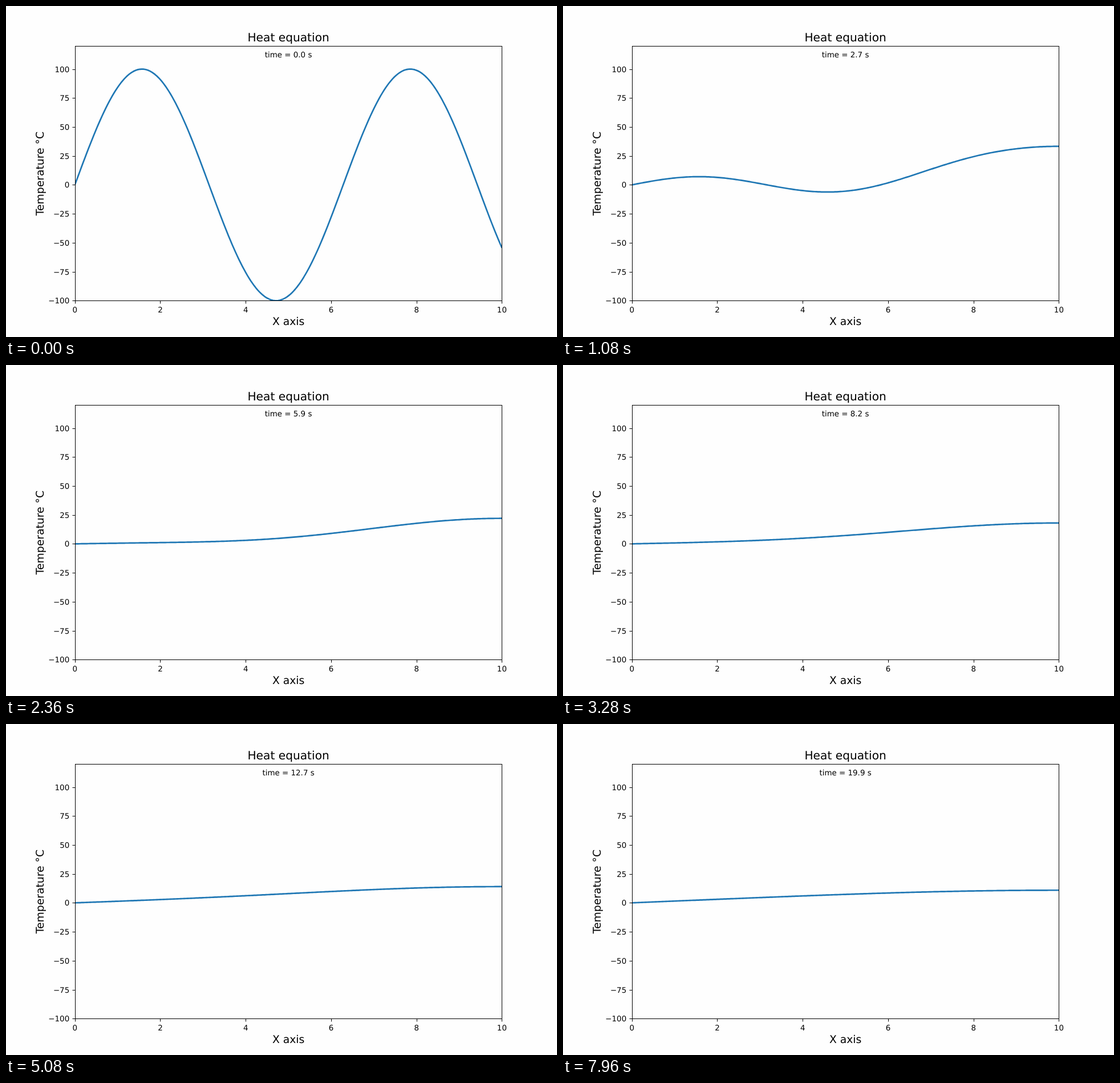
Animation, 966 px wide and 580 px high, one loop 8 s. Source, as an HTML page:

```html
<!DOCTYPE html>
<html lang="en">
<head>
<meta charset="utf-8">
<title>Heat equation</title>
<style>
  html, body { margin: 0; width: 100%; height: 100%; overflow: hidden; background: #fefefe; }
  svg { display: block; width: 966px; height: 580px; }
  text { font: 13.42px "DejaVu Sans", sans-serif; text-anchor: middle; text-rendering: geometricPrecision; }
  .label { font-size: 18.78px; }
  .title { font-size: 20.2px; }
  .tick { text-anchor: end; }
  .axis { fill: none; stroke: #000; stroke-width: 1; }
  #curve { fill: none; stroke: #1f77b4; stroke-width: 2.68; stroke-linejoin: round; }
</style>
</head>
<body>
<svg viewBox="0 0 966 580">
  <clipPath id="plot"><rect x="120.75" y="69.95" width="748.65" height="446.29"/></clipPath>
  <path id="curve" clip-path="url(#plot)"/>
  <g id="axes"><rect class="axis" x="121.5" y="70.5" width="748" height="446"/></g>
  <text class="title" x="495.1" y="62">Heat equation</text>
  <text class="label" x="495.1" y="559">X axis</text>
  <text class="label" transform="translate(66 293.6) rotate(-90)">Temperature °C</text>
  <text id="clock" x="495.1" y="90"></text>
</svg>
<script>
const STEP_MS = 40, STEPS = 200, SECONDS_PER_STEP = 0.1;
const AMPLITUDE = 100, LENGTH = 10, DIFFUSIVITY = 0.982, MODES = 60, SAMPLES = 250;

const px = x => 120.75 + x * 74.865;
const py = temp => 313.385 - temp * 2.0286;
const snap = v => Math.round(v) + 0.5;

const axes = document.getElementById('axes');
const curve = document.getElementById('curve');
const clock = document.getElementById('clock');

function add(tag, attrs, content = '') {
  const node = document.createElementNS('http://www.w3.org/2000/svg', tag);
  for (const key in attrs) node.setAttribute(key, attrs[key]);
  node.textContent = content;
  axes.append(node);
}

for (let x = 0; x <= 10; x += 2) {
  add('path', { class: 'axis', d: `M${snap(px(x))} 516.5v5` });
  add('text', { x: px(x), y: 537 }, x);
}
for (let temp = -100; temp <= 100; temp += 25) {
  add('path', { class: 'axis', d: `M121.5 ${snap(py(temp))}h-5` });
  add('text', { class: 'tick', x: 111.2, y: Math.round(py(temp) + 5) }, String(temp).replace('-', '\u2212'));
}

// Modes of a rod held at zero on the left and insulated on the right.
const modes = Array.from({ length: MODES }, (_, n) => {
  const k = (n + 0.5) * Math.PI / LENGTH;
  const overlap = Math.sin((1 - k) * LENGTH) / (1 - k) - Math.sin((1 + k) * LENGTH) / (1 + k);
  return { k, weight: AMPLITUDE * overlap / LENGTH };
});

function profile(seconds) {
  if (seconds === 0) return x => AMPLITUDE * Math.sin(x);
  const live = modes
    .map(({ k, weight }) => ({ k, weight: weight * Math.exp(-DIFFUSIVITY * k * k * seconds) }))
    .filter(mode => Math.abs(mode.weight) > 1e-4);
  return x => live.reduce((sum, { k, weight }) => sum + weight * Math.sin(k * x), 0);
}

function draw(step) {
  const seconds = step * SECONDS_PER_STEP;
  const temperature = profile(seconds);
  const points = Array.from({ length: SAMPLES + 1 }, (_, i) => {
    const x = i * LENGTH / SAMPLES;
    return `${px(x).toFixed(2)} ${py(temperature(x)).toFixed(2)}`;
  });
  curve.setAttribute('d', 'M' + points.join('L'));
  clock.textContent = `time = ${seconds.toFixed(1)} s`;
}

let shown = -1;
function tick(now) {
  const step = Math.floor(now / STEP_MS) % STEPS;
  if (step !== shown) draw(shown = step);
  requestAnimationFrame(tick);
}
draw(0);
requestAnimationFrame(tick);
</script>
</body>
</html>
```
